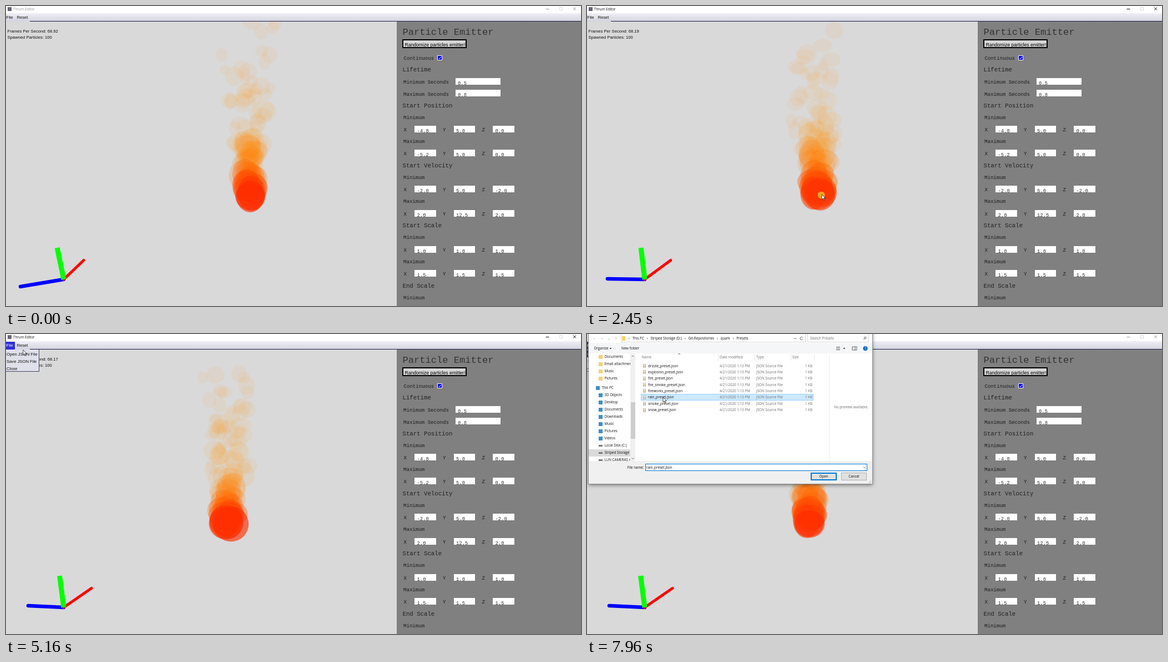
An HTML page with a canvas that plays this animation: 1036x541 px, repeating every 8000 ms.

```html
<!DOCTYPE html>
<html lang="en">
<head>
<meta charset="utf-8">
<title>Particle editor</title>
<style>
html, body { margin: 0; width: 100%; height: 100%; overflow: hidden; }
#stage { position: relative; width: 1036px; height: 541px; overflow: hidden; background: #d9d9d9;
  font: 7.65px "Liberation Sans", Arial, sans-serif; color: #111; }
#stage div, #stage canvas, #stage svg { position: absolute; box-sizing: border-box; }
#stage .t { line-height: 0; white-space: pre; }
.ui { font-family: "Open Sans", "Noto Sans", sans-serif; font-size: 6.25px; }
#stage .layer { left: 0; top: 0; width: 1036px; height: 541px; }
#scene { left: 0; top: 28px; }
#panel { font: 9.1px "Liberation Mono", monospace; color: #1c1c1c; }
#panel .h1 { font-size: 17.1px; color: #333; }
#panel .h2 { font-size: 10.7px; color: #222; }
#panel .field { background: #fff; overflow: hidden; font-size: 8.9px; color: #333; }
#panel .button { border: 2px solid #000; background: #d6d6d6; color: #000; font: 8.62px "Liberation Sans", Arial, sans-serif; }
.bar { background: linear-gradient(#efeff5, #d3d3de); }
.idle { color: #999; }
.cell, .pick { background: #2c2cdc; color: #fff; }
.list { background: #e0e0ea; border: solid #446; border-width: 0 1px 1px 0; }
.box { background: #fff; border: 1px solid #d9d9d9; }
.button2 { background: #e1e1e1; border: 1px solid #adadad; text-align: center; line-height: 11px; }
.gray { color: #6d6d6d; }
.right { transform: translateX(-100%); }
.mid { transform: translateX(-50%); }
#dialog { transform-origin: 258.5px 0; }
#rowMark { border: 1px solid transparent; }
</style>
</head>
<body>
<div id="stage">
  <canvas id="scene" width="704" height="513"></canvas>
  <div id="hud" class="layer"></div>
  <div id="panel" class="layer"></div>
  <div id="frame" class="layer"></div>
  <div id="menu" class="layer"></div>
  <div id="dialog" class="layer ui"></div>
  <svg id="pointer" class="layer" width="1036" height="541">
    <g id="arrow">
      <circle id="press" cx="-1" cy="1" r="6.5" fill="#ffbe28" fill-opacity=".82"/>
      <path d="M0 0V9L2.1 7.1 3.6 10.6 5 10 3.5 6.6H6.4Z" fill="#fff" stroke="#222" stroke-width=".8"/>
    </g>
  </svg>
</div>
<script>
const LOOP = 8000, STEP = 77, FREEZE = 5929;
const $ = id => document.getElementById(id);

function box(parent, x, y, w, h, cls = "", bg = "") {
  const el = document.createElement("div");
  el.className = cls;
  el.style.cssText = `left:${x}px;top:${y}px;width:${w}px;height:${h}px;` + (bg && `background:${bg}`);
  return parent.appendChild(el);
}

// y is the middle of the line
function text(parent, x, y, str, cls = "") {
  const el = document.createElement("div");
  el.className = "t " + cls;
  el.style.left = x + "px";
  el.style.top = y + "px";
  el.textContent = str;
  return parent.appendChild(el);
}

const group = parent => box(parent, 0, 0, 1036, 541, "layer");

// ---- heads-up text ----
const fps = text($("hud"), 2.5, 45.5, "");
text($("hud"), 2.5, 56.5, "Spawned Particles: 100");

// ---- side panel ----
const panel = $("panel");
box(panel, 704, 28, 332, 513, "", "#808080");
text(panel, 714.5, 48, "Particle Emitter", "h1");
text(box(panel, 714, 60, 116, 16, "button"), 2.5, 7.5, "Randomize particles emitter!");
text(panel, 716.5, 94.5, "Continuous");
const check = box(panel, 777, 89, 9, 9, "", "#00f");
check.style.border = "1px solid #eef";
check.innerHTML = '<svg width="8" height="8"><path d="M1.5 4 3 5.5 6 1.8" fill="none" stroke="#fff"/></svg>';

function field(x, y, w, value) {
  text(box(panel, x, y, w, 12, "field"), 4.5, 10, value);
}
text(panel, 714.5, 114.5, "Lifetime", "h2");
["Minimum Seconds 0.5", "Maximum Seconds 0.8"].forEach((line, i) => {
  const y = 138 + i * 21.8;
  text(panel, 716, y, line.slice(0, 15));
  field(809.5, y - 8.5, 81, line.slice(16));
});
const sections = [
  ["Start Position", "-4.8 5.0 0.0", "-5.2 5.0 0.0"],
  ["Start Velocity", "-2.0 5.0 -2.0", "2.0 12.5 2.0"],
  ["Start Scale", "1.0 1.0 1.0", "1.5 1.5 1.5"],
];
sections.forEach(([title, ...limits], i) => {
  const top = 179.5 + i * 108.3;
  text(panel, 714.5, top, title, "h2");
  limits.forEach((values, j) => {
    const y = top + 22 + j * 43.4;
    text(panel, 716, y, j ? "Maximum" : "Minimum");
    values.split(" ").forEach((value, k) => {
      text(panel, 716.5 + k * 70.5, y + 22.5, "XYZ"[k]);
      field(736 + k * 70.5, y + 14.5, 38.5, value);
    });
  });
});
text(panel, 714.5, 504.5, "End Scale", "h2");
text(panel, 716, 526.5, "Minimum");

// ---- window frame ----
const frame = $("frame");
box(frame, 0, 0, 1036, 13, "", "#fff");
box(frame, 0, 13, 1036, 15, "bar");
box(frame, 43, 27, 993, 1, "", "#1c1c48");
box(frame, 2.5, 2, 7, 7, "", "#667");
const caption = group(frame);
text(caption, 13, 5.5, "Thrum Editor", "ui");
const glyphs = box(caption, 970, 0, 70, 12);
glyphs.innerHTML = `<svg width="70" height="12" fill="none" stroke="currentColor">
  <path d="M2.5 5.5h6M52 2.5l5 5m0-5l-5 5"/><path d="M27.5 2.5h5v5h-5z" stroke="#ddd"/></svg>`;
text(frame, 0.5, 21, "File");
text(frame, 19.5, 21, "Reset");

// ---- drop-down menu ----
const menu = $("menu");
text(box(menu, 0, 14, 16, 13.5, "cell"), 0.5, 7, "File");
const list = box(menu, 0, 28, 60, 40, "list");
const pick = box(list, 0, 1, 59, 12.5, "pick");
const items = ["Open JSON File", "Save JSON File", "Close"].map((s, i) => text(list, 1, 8.5 + i * 13, s));

// ---- file dialog ----
const dialog = $("dialog");
const shell = box(dialog, 3, -8, 511, 278, "", "#fcfcfb");
shell.style.boxShadow = "0 0 0 1px #8b8b8b, 0 2px 7px #0008";
box(dialog, 3, 229, 511, 41, "", "#ededed");
const blank = "#f8f8f8";
box(dialog, 74, 235, 29, 8, "", blank);
box(dialog, 105, 234, 400, 12, "", blank);
box(dialog, 403, 250, 47, 13, "", blank);
box(dialog, 458, 250, 46, 13, "", blank);

const files = group(dialog);
box(files, 3, -8, 511, 237, "", "#fff");
box(files, 3, 16, 511, 19, "", "#f5f6f7");
box(files, 3, 229, 511, 41, "", "#f0f0f0");
["←", "→", "⌄", "↑"].forEach((s, i) => text(files, 10 + i * 13.5, 7.5, s, i < 3 ? "gray" : ""));
box(files, 61, -2, 333, 17, "box");
box(files, 397, -2, 111, 17, "box");
box(files, 63, 4, 6, 8, "", "#f5d06c");
const crumbs = ["", "This PC", "Striped Storage (D:)", "Git-Repositories", "quark", "Presets"];
text(files, 70, 7.5, crumbs.join("   ›   "));
text(files, 402, 8, "Search Presets", "gray");
text(files, 12.5, 26, "Organize");
text(files, 62, 26, "New folder");

const side = box(files, 3, 35, 75, 194);
side.style.overflow = "hidden";
const places = ["Documents", "Email attachments", "Music", "Pictures", "This PC", "3D Objects", "Desktop", "Documents",
  "Downloads", "Music", "Pictures", "Videos", "Local Disk (C:)", "Striped Storage (D:)", "LUN CAMERAS (G:)"];
box(side, 0, 173, 75, 13, "", "#d9d9d9");
places.forEach((name, i) => {
  const y = 6 + i * 13.03 + (i < 4 ? 0 : 4);
  const indent = name === "This PC" ? 13 : 18;
  const drive = name.includes(":");
  const h = drive ? 3 : 7;
  box(side, indent, y - h / 2, 7, h, "", i < 4 ? "#f5d06c" : drive ? "#777" : "#3d8fc4");
  text(side, indent + 10.5, y, name);
});
box(files, 78, 35, 9, 194, "", "#f0f0f0");
box(files, 79, 123, 7.5, 66, "", "#cdcdcd");

const columns = { Name: 98.5, "Date modified": 239, Type: 305, Size: 370 };
for (const [name, x] of Object.entries(columns)) {
  text(files, x, 41.5, name, "gray");
  if (x > 99) box(files, x - 3, 36, 1, 12, "", "#e5e5e5");
}
box(files, 409, 36, 1, 12, "", "#e5e5e5");
box(files, 436, 36, 1, 192, "", "#eee");
const rowMark = box(files, 97, 0, 311, 11.8);
rowMark.id = "rowMark";
const ROW = 11.37;
["drizzle", "explosion", "fire", "fire_smoke", "fireworks", "rain", "smoke", "snow"].forEach((name, i) => {
  const y = 57.5 + i * ROW;
  box(files, 100.5, y - 3.5, 5, 7, "box").style.borderColor = "#b9b5ad";
  box(files, 101.5, y - .5, 3.5, 2, "", "#d8b27a");
  text(files, 110, y, name + "_preset.json");
  text(files, columns["Date modified"], y, "4/21/2020 1:13 PM", "gray");
  text(files, columns.Type, y, "JSON Source File", "gray");
  text(files, 406, y, "1 KB", "gray right");
});
const preview = text(files, 476, 132, "", "gray mid");
text(files, 102.5, 240.5, "File name:", "right");
box(files, 105, 234, 400, 12.5, "box").style.borderColor = "#0078d7";
const fileName = text(files, 107, 240.8, "");
const open = box(files, 403, 250, 47, 13.5, "button2");
open.textContent = "Open";
open.style.boxShadow = "inset 0 0 0 1px #0078d7";
open.style.borderColor = "#0078d7";
box(files, 458, 250, 46, 13.5, "button2").textContent = "Cancel";
group(files).innerHTML = `<svg width="517" height="271" fill="none" stroke="#555" stroke-width=".9">
  <defs><path id="chevron" d="M-2-1 0 1 2-1"/><path id="caret" d="M-2-1h4L0 1.300z" fill="#333" stroke="none"/></defs>
  <use href="#chevron" x="375" y="8"/><use href="#chevron" x="500" y="240.500"/><use href="#chevron" x="82.500" y="224.500"/>
  <use href="#chevron" transform="translate(166 36) scale(1 -1)"/><use href="#chevron" transform="translate(82.500 40) scale(1 -1)"/>
  <use href="#caret" x="42.500" y="26"/><use href="#caret" x="463.500" y="26"/>
  <path d="M388.500 6.500a2.500 2.500 0 1 0 .2 2.500M498 10.500l2.200-2.200"/><circle cx="501.300" cy="7" r="1.800"/>
  <path d="M449 23.500h7m-7 2.500h7m-7 2.500h7M478 23h8v6h-8zM483 23v6"/>
  <circle cx="501.500" cy="26" r="4.200" fill="#0a6fc9" stroke="none"/>
  <path d="M508 268.500l4-4m-1.500 4l1.500-1.500" stroke="#aaa"/></svg>`;
text(files, 501.5, 26, "?", "mid").style.color = "#fff";

// ---- motion ----
// time, sideways turn of the view
const turns = [[0, 25], [693, 30], [1150, 46], [1694, 22], [2530, 37], [4310, 37], [4700, 39]];
// time, pointer position
const path = [
  [77, 540, 360], [693, 459, 337], [1150, 370, 340], [1694, 458, 339], [2530, 420, 340], [3234, 115, 77],
  [4389, 11, 20], [5900, 50, 37], [6083, 62, 40], [6830, 136, 88], [7170, 138, 135], [7480, 137, 114],
];
const clicks = [4389, 5850, 7540];
const rates = ["68.92", "67.53", "68.19", "68.58", "67.99", "68.17"];

const clamp = v => Math.min(1, Math.max(0, v));

function along(keys, t) {
  const n = keys.findIndex(k => k[0] > t);
  const a = keys[n < 0 ? keys.length - 1 : Math.max(0, n - 1)];
  const b = n < 0 ? a : keys[n];
  const p = clamp((t - a[0]) / (b[0] - a[0] || 1));
  return a.slice(1).map((v, i) => v + (b[i + 1] - v) * p);
}

function random(slot, life, n) {
  const v = Math.sin(slot * 127.1 + life * 311.7 + n * 74.7) * 43758.5453;
  return v - Math.floor(v);
}

const ctx = $("scene").getContext("2d");

function particle(slot, time) {
  const span = .5 + .3 * random(slot, 0, 9);
  const clock = time / 1000 / span + random(slot, 0, 8);
  const life = Math.floor(clock), u = clock - life, age = u * span;
  const r = n => random(slot, life + 1, n);
  const young = (1 - u) ** 2;
  const size = n => (23 + 10 * r(n)) * young + (8 + 9 * r(n + 1)) * (1 - young);
  return {
    u, rx: size(4), ry: size(6),
    x: (r(1) - .5) * 14 + (r(2) - .5) * 160 * age,
    y: 344 - (210 + 315 * r(3)) * age,
  };
}

// Red and dense at birth, soon pale orange and thin
function fire(x, time) {
  Array.from({ length: 100 }, (_, i) => particle(i, time))
    .sort((a, b) => b.u - a.u)
    .forEach(p => {
      const green = 158 - 115 * (1 - p.u) ** 5;
      ctx.fillStyle = `rgba(255,${green},${50 * p.u},${.08 + .57 * (1 - p.u) ** 7})`;
      ctx.beginPath();
      ctx.ellipse(x + p.x, p.y, p.rx, p.ry, 0, 0, 7);
      ctx.fill();
    });
}

function axis(x, y, width, color) {
  ctx.strokeStyle = color;
  ctx.lineWidth = width;
  ctx.beginPath();
  ctx.moveTo(104, 493);
  ctx.lineTo(x, y);
  ctx.stroke();
}

function drawScene(t) {
  const [turn] = along(turns, t);
  const tilt = 7.6 * clamp(1 - t / 1300);
  ctx.setTransform(1, 0, 0, 1, 0, -28);
  ctx.fillStyle = "#d9d9d9";
  ctx.fillRect(0, 28, 704, 513);
  fire(410 - (turn - 37) * 4.45 - tilt * 3.2, Math.min(t, FREEZE));
  ctx.lineCap = "round";
  axis(turn + 1, 490 + (39 - turn) * .6 + tilt, 6.5, "#00f");
  axis(turn + 115, 458.5, 5, "#f00");
  ctx.lineCap = "butt";
  axis(97 + (37 - turn) * .2 - tilt * .95, 436, 9, "#0f0");
}

const show = (el, on) => { el.style.display = on ? "" : "none"; };

function drawUi(t) {
  const [x, y] = along(path, t);
  $("arrow").setAttribute("transform", `translate(${x} ${y})`);
  show($("arrow"), t >= STEP);
  show($("press"), t > 600 && t < 2500 || clicks.some(c => Math.abs(t - c) < 65));
  fps.textContent = "Frames Per Second: " + rates[Math.min(5, Math.round(t / 1100))];
  caption.className = "layer" + (t < 400 || t >= FREEZE ? " idle" : "");

  const fading = t > 6040 && t < 6150;
  show(menu, t >= 4200);
  menu.style.zIndex = fading ? 1 : "";
  menu.style.opacity = fading ? .42 : 1;
  show(list, t >= 4450);
  const onOpen = y > 29;
  show(pick, onOpen);
  items[0].style.color = onOpen ? "#fff" : "";

  const shown = clamp((t - 6083) / STEP);
  show(dialog, t > 6040);
  dialog.style.opacity = .88 + .12 * shown;
  dialog.style.transform = `scale(${.988 + .012 * shown})`;
  show(files, t > 6200);

  const chosen = t >= 7480;
  const row = Math.floor((y - 51.8) / ROW);
  show(rowMark, x > 97 && row >= 0 && row < 8);
  rowMark.style.top = 51.6 + row * ROW + "px";
  rowMark.style.background = chosen ? "#cce8ff" : "#e5f3ff";
  rowMark.style.borderColor = chosen ? "#99d1ff" : "transparent";
  fileName.textContent = chosen ? "rain_preset.json" : "";
  preview.textContent = chosen ? "No preview available." : "Select a file to preview.";
}

const start = performance.now();
function tick() {
  const now = (performance.now() - start) % LOOP;
  const t = Math.floor((now + 25) / STEP) * STEP;
  drawScene(t);
  drawUi(t);
  requestAnimationFrame(tick);
}
tick();
</script>
</body>
</html>
```
